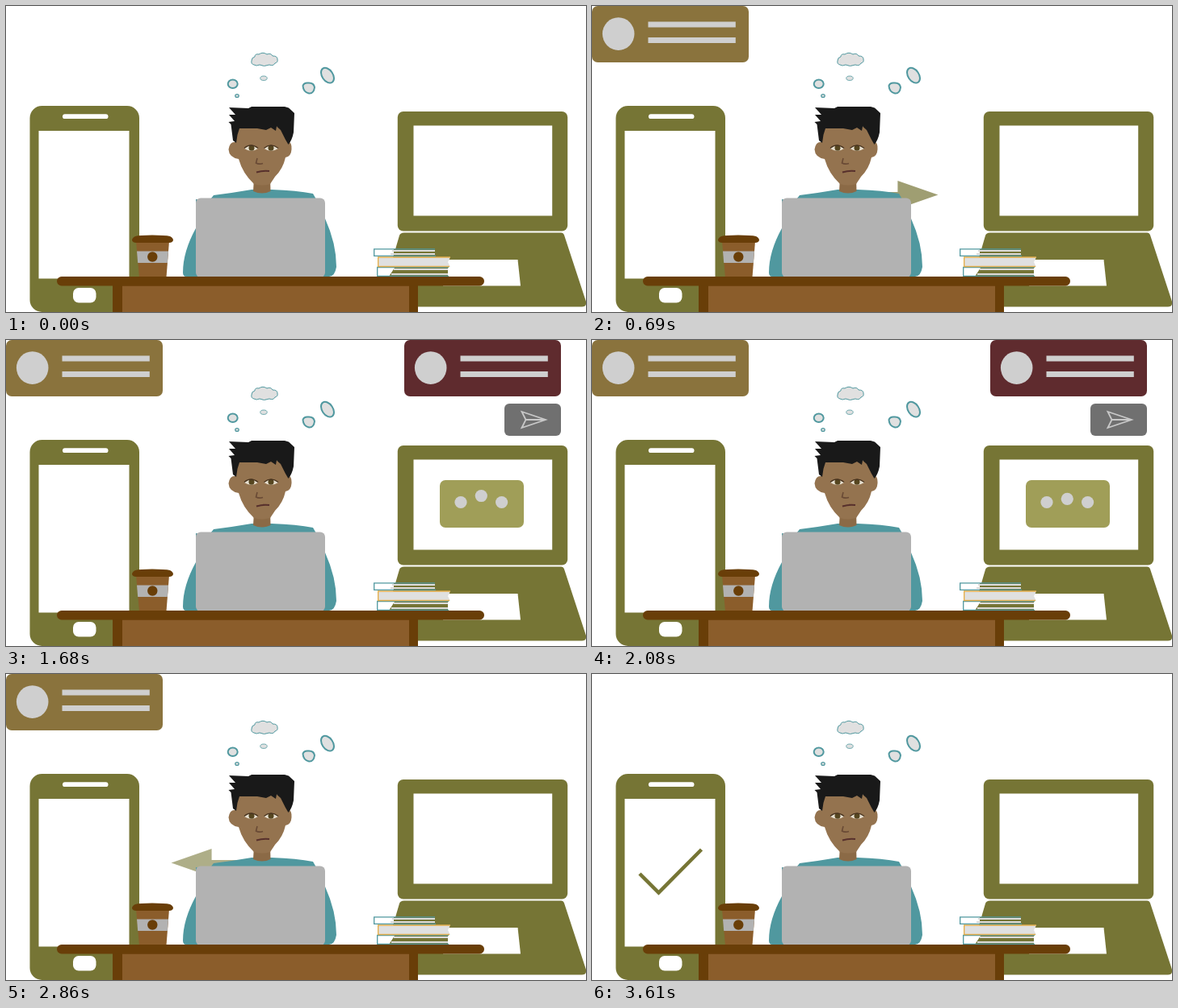
An HTML page for the animation above (4.61 s loop, 718 px wide and 380 px high).

```html
<!DOCTYPE html>
<html lang="en">
<head>
<meta charset="utf-8">
<title>Message exchange</title>
<style>
  html, body { margin: 0; width: 100%; height: 100%; overflow: hidden; background: #fff; }
  svg { display: block; width: 100vw; height: 100vh; }
</style>
</head>
<body>
<svg viewBox="0 0 718 380">
  <defs>
    <g id="info" fill="#cfcfcf">
      <ellipse cx="32.7" cy="34.6" rx="19.8" ry="20.3"/>
      <path d="M69.5 19.5h108.3v7h-108.3zM69.5 39h108.3v7h-108.3z"/>
    </g>
    <!-- Arrow pointing right with its tip at the origin -->
    <path id="arrow" d="M0 0L-50-17.5V-3.5H-110V3.5H-50V17.5Z" fill="#767535"/>
  </defs>

  <g id="phone">
    <rect x="29.5" y="124" width="135.5" height="256" rx="15" fill="#767535"/>
    <rect x="40.5" y="155" width="112" height="183.5" fill="#fff"/>
    <rect x="70" y="134.3" width="56.5" height="5.8" rx="2.9" fill="#fff"/>
    <rect x="83" y="350" width="28.5" height="18.5" rx="7" fill="#fff"/>
    <path id="check" d="M59 248L82.5 271.5L135.5 218" pathLength="100" stroke-dasharray="100 200"
          fill="none" stroke="#767535" stroke-width="4.5"/>
  </g>

  <g id="laptop">
    <rect x="484.8" y="131" width="210.4" height="148.5" rx="7" fill="#767535"/>
    <rect x="504.5" y="148.5" width="171.7" height="112" fill="#fff"/>
    <path d="M493 281.5H687Q690 281.5 691 284.5L718 367Q719 373.5 713 373.5H468Q461 373.5 463 367L487 285Q488 281.5 493 281.5Z" fill="#767535"/>
    <path d="M545 315H633.5L637 347.5H541Z" fill="#fff"/>
  </g>

  <g id="bubble">
    <rect x="537" y="174" width="104" height="59" rx="7" fill="#a09e58"/>
    <g fill="#cfcfcf">
      <circle class="dot" cx="563" cy="201.5" r="7.6"/>
      <circle class="dot" cx="588.3" cy="201.5" r="7.6"/>
      <circle class="dot" cx="613.6" cy="201.5" r="7.6"/>
    </g>
  </g>

  <g id="cardLeft">
    <rect width="194" height="70" rx="7" fill="#8a733d"/>
    <use href="#info"/>
  </g>
  <g id="cardRight">
    <rect x="493" width="194" height="70" rx="7" fill="#5f2b2e"/>
    <use href="#info" x="493"/>
    <rect id="send" x="617" y="79" width="70" height="40" rx="6"/>
    <path d="M638.5 89L668 99L638.5 109L643.5 99ZM643.5 99H668" fill="none" stroke="#c8c8c8" stroke-width="1.8"/>
  </g>

  <use id="arrowOut" href="#arrow"/>
  <use id="arrowBack" href="#arrow"/>

  <g id="thoughts" fill="#e0e0e0" stroke="#50989f">
    <path d="M307 73Q303 72 304 68Q304 64 308 63Q308 59 313 60Q318 56.500 323 60Q328 58 330 62Q336 62 336 66Q337 70 333 71Q331 75 326 73Q319 76 314 73Q310 75 307 73Z"/>
    <ellipse cx="319" cy="89.700" rx="4.200" ry="2.700" stroke-width=".8"/>
    <ellipse cx="280.700" cy="96.700" rx="6" ry="5.300" stroke-width="2"/>
    <ellipse cx="286" cy="111.500" rx="2.200" ry="1.900" stroke-width="1.300"/>
    <path d="M367.500 99Q369 95 374 95.500Q381 95 382 101Q381 109 375 108.500Q368 107 367.500 99Z" stroke-width="2"/>
    <ellipse cx="398" cy="86.200" rx="6.700" ry="10.300" transform="rotate(-34 398 86.200)" stroke-width="2"/>
  </g>

  <g id="person">
    <path d="M219 331Q219 305 235 276V240H253L257 235Q281 232 304 228H329Q360 229 380 233L384 240L395 264Q409 295 409 324Q407 336 400 336H223Q219 336 219 331Z" fill="#50989f"/>
    <path d="M307 214H327L327.500 230Q317 235 306 230Z" fill="#8b6a46"/>
    <path d="M286 150H342L349 168Q354 169 353.500 178Q353 187 346 188Q343 202 333 212L327 221Q317 224 307 221Q293 208 288 190Q276 188 275.500 178Q277 168 284 169Z" fill="#94734f"/>
    <path d="M276 126L300 127L304 125H345L350 126.500L357 133L356 157Q354 167 349.500 172L346 166L340 154L335 149.500L334 155L328 151L322 154L311 152H289L286.500 160L285 170L281 167L278.500 147L275.500 144L283 143L276 135L284 135Z" fill="#191919"/>
    <g id="eyes">
      <path d="M295 177Q303 169.500 312 177Q304 183 295 177ZM319.500 177Q328 169.500 337 177Q328 183 319.500 177Z" fill="#e6dfcf"/>
      <g fill="#55451f"><circle cx="304" cy="176.300" r="3.500"/><circle cx="328" cy="176.300" r="3.500"/></g>
      <path d="M295 176.500Q303 169.500 312 176.500M319.500 176.500Q328 169.500 337 176.500" fill="none" stroke="#49341f" stroke-width="1.300"/>
    </g>
    <path d="M311 189L309.500 195Q313 197 318 195.500" fill="none" stroke="#694a35" stroke-width="1.600"/>
    <path d="M310 206.500Q318 204 326 205" fill="none" stroke="#57302c" stroke-width="2"/>
    <rect x="235" y="238.500" width="160" height="98.500" rx="6" fill="#b2b2b2"/>
  </g>

  <g id="cup">
    <path d="M161 292H202L198.500 337H165Z" fill="#8b5d2b"/>
    <path d="M162 304.500H201L199.800 319H163.200Z" fill="#b2b2b2"/>
    <circle cx="181.300" cy="311.500" r="6.200" fill="#693e08"/>
    <path d="M160 286Q165 284.500 181 284.500T203 286Q207 288 207 291Q206 294 202 294H161Q157 294 156 291Q156 288 160 286Z" fill="#693e08"/>
  </g>

  <g id="books">
    <path d="M480 302H531V310H480ZM480 325H547V336H480Z" fill="#767535"/>
    <path d="M456 302H480L474 310H456ZM460 325H481L474 336H460Z" fill="#fff"/>
    <path d="M478 304H531M476 308H531M480 327H547M477 333H547" stroke="#dcdcdc" stroke-width="2.200"/>
    <path d="M531 301.800H455.700V310.300H532M548 324.500H459.700V335.500H548" fill="none" stroke="#50989f" stroke-width="1.300"/>
    <path d="M461 312H550L547 318L550 324H461Z" fill="#e0e0e0"/>
    <path d="M550 312H460.700V323.500H549" fill="none" stroke="#e5b04f" stroke-width="1.400"/>
  </g>

  <g id="desk">
    <path d="M132 346H510V380H132Z" fill="#693e08"/>
    <path d="M144 347.500H499V380H144Z" fill="#8b5d2b"/>
    <rect x="63" y="336" width="529" height="11.500" rx="5.700" fill="#693e08"/>
  </g>
</svg>
<script>
  const LOOP = 4610, CARD_DROP = 127, ARROW_TRAVEL = 160, ARROW_Y = 234.5;
  const find = id => document.getElementById(id);
  const dots = [...document.querySelectorAll('.dot')];
  const parts = {};
  for (const id of ['cardLeft', 'cardRight', 'send', 'bubble', 'arrowOut', 'arrowBack', 'check']) parts[id] = find(id);

  // Linear progress from 0 to 1 between two times
  const ramp = (t, from, to) => Math.min(1, Math.max(0, (t - from) / (to - from)));

  function place(node, x, y, opacity) {
    node.setAttribute('transform', `translate(${x} ${y})`);
    node.setAttribute('opacity', opacity);
  }

  function showCard(node, shown) {
    place(node, 0, CARD_DROP * (1 - shown), shown);
  }

  function showArrow(node, t, from, to, startX, dir) {
    const p = ramp(t, from, to);
    place(node, startX + dir * ARROW_TRAVEL * p, ARROW_Y, t < from ? 0 : 1 - p);
    if (dir < 0) node.setAttribute('transform', node.getAttribute('transform') + ' scale(-1 1)');
  }

  function draw(t) {
    showCard(parts.cardLeft, ramp(t, 150, 435) - ramp(t, 2990, 3275));
    showCard(parts.cardRight, ramp(t, 900, 1185) - ramp(t, 2275, 2560));
    parts.send.setAttribute('fill', t < 2170 ? '#707070' : '#767535');

    showArrow(parts.arrowOut, t, 570, 970, 380, 1);
    showArrow(parts.arrowBack, t, 2690, 3105, 270.5, -1);

    parts.bubble.setAttribute('opacity', ramp(t, 1200, 1320) - ramp(t, 2140, 2260));
    dots.forEach((dot, i) => {
      const phase = (t - 1605 - (i - 1) * 150 + 4500) % 450;
      const lift = phase < 150 ? 8 * Math.sin(Math.PI * phase / 150) : 0;
      dot.setAttribute('cy', 201.5 - lift);
    });

    const drawn = ramp(t, 3280, 3610);
    parts.check.setAttribute('stroke-dashoffset', 100 * (1 - drawn));
    parts.check.setAttribute('opacity', drawn > 0 ? 1 : 0);
  }

  const start = performance.now();
  function tick() {
    draw((performance.now() - start) % LOOP);
    requestAnimationFrame(tick);
  }
  draw(0);
  requestAnimationFrame(tick);
</script>
</body>
</html>
```
